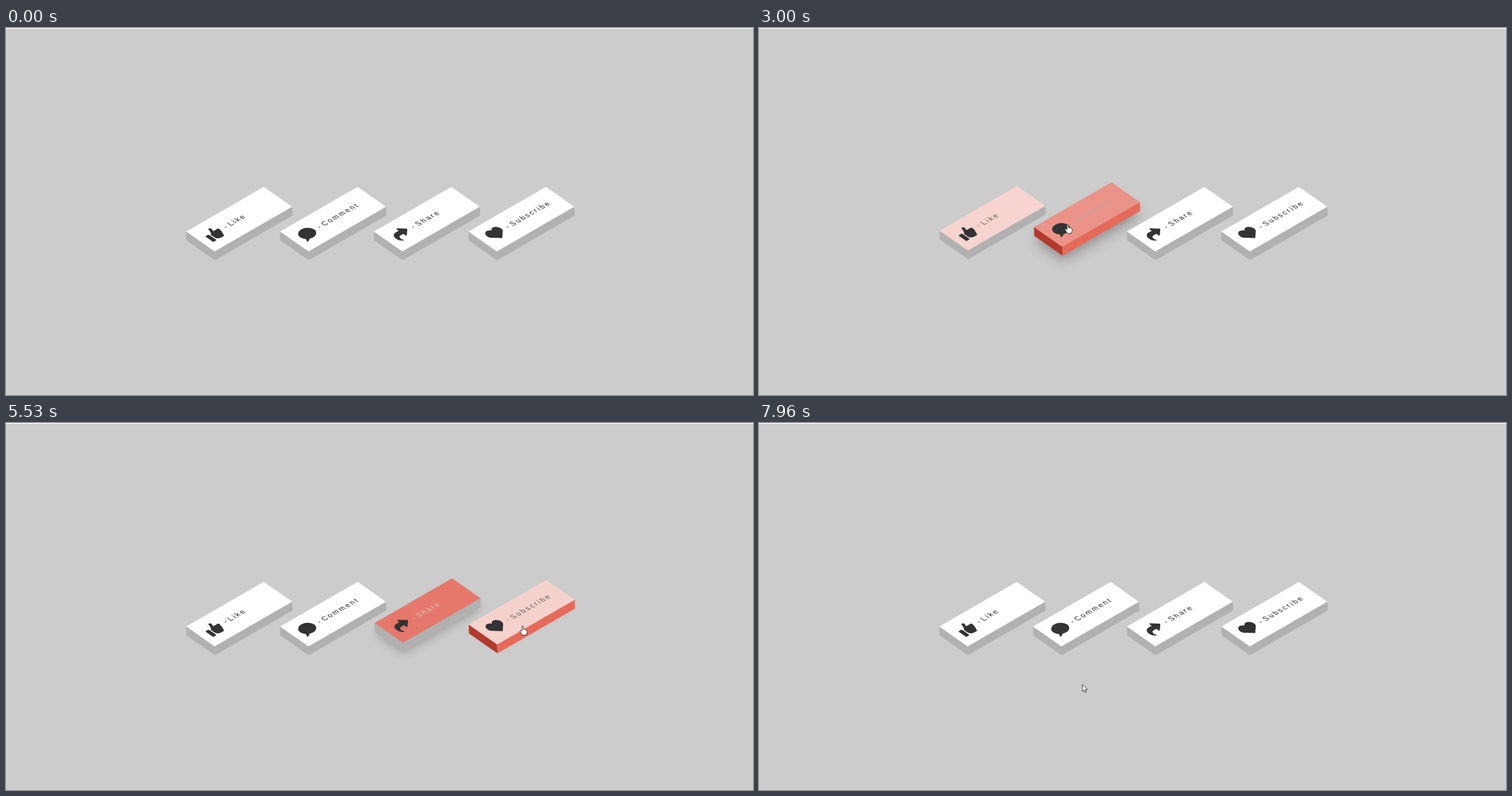
An HTML page that plays this animation: 1067x525 px, repeating every 8 s.

```html
<!DOCTYPE html>
<html lang="en">
<head>
<meta charset="utf-8">
<title>Isometric buttons</title>
<style>
  html, body { margin: 0; width: 100%; height: 100%; overflow: hidden; }
  body { position: relative; background: linear-gradient(#fff 1.5px, #ccc 1.5px); }
  .button {
    position: absolute; top: 251px; width: 128.2px; height: 44.8px;
    font: 10px/44.8px "Liberation Sans", Arial, sans-serif;
    letter-spacing: 2.22px; word-spacing: -3px; white-space: nowrap;
    --left: #b1b1b1; --front: #b1b1b1;
  }
  .button.on { --left: #b33a2c; --front: #e66a5a; }
  .button::before, .button::after { content: ""; position: absolute; }
  .button::before {
    right: 100%; top: 0; width: 11px; height: 100%;
    background: var(--left); transform: skewY(-45deg); transform-origin: right;
  }
  .button::after {
    left: 0; top: 100%; width: 100%; height: 11px;
    background: var(--front); transform: skewX(-45deg); transform-origin: top;
  }
  .button svg {
    position: absolute; left: 11.3px; top: 11px; width: 22.7px; height: 22.7px;
    fill: #333; stroke-linejoin: round;
  }
  .button span { position: absolute; left: 39.8px; top: .4px; }
  #cursor { position: absolute; left: 0; top: 0; width: 20px; height: 20px; overflow: visible; }
  #cursor path { fill: #fff; stroke: #222; stroke-width: .8; stroke-linejoin: round; }
</style>
</head>
<body>
<svg id="cursor">
  <path id="arrow" d="M0 0V10l2.3-2.2 1.6 3.5 1.6-.7-1.5-3.4h3z"/>
  <path id="hand" d="M-1 1C-1-.3 1-.3 1 1V5l4 .8q1.2.2 1.2 1.5V9.5q0 1.5-.8 2.7V13.3H-.8C-1.8 11-3 9.5-3.7 8-4 6.4-2.4 6.2-1 8z"/>
</svg>
<script>
const LOOP = 8000, STEP = 69, FADE = 500, COLOR_LAG = 64, POINTER_LEAD = 50;

// hover: alternating enter and leave times
const items = [
  { label: "Like", hover: [1320, 2640], icon: `
    <rect y="192" width="128" height="288" rx="32"/>
    <path d="M160 240C230 200 240 130 265 60 290 0 375 30 345 110L315 176H464c48 0 64 56 22 91
      20 30 5 66-28 77 14 32-6 62-27 71 4 38-17 65-47 65H290C200 480 160 410 160 368z"/>` },
  { label: "Comment", hover: [2760, 4200], icon: `
    <ellipse cx="256" cy="240" rx="256" ry="208"/>
    <path d="M60 360Q60 420 10 465 0 480 16 480 90 480 160 420z"/>` },
  { label: "Share", hover: [4290, 5376], icon: `
    <path d="M310 55L490 210 310 365z" stroke="#333" stroke-width="44"/>
    <path d="M310 128H176C-30 128-50 400 100 478 115 483 128 468 108 440 70 380 110 288 192 288H310z"/>` },
  { label: "Subscribe", hover: [5440, 5640, 5985, 7380], icon: `
    <path d="M256 480L48 300C17 272 0 232 0 185 0 50 160-30 256 96 352-30 512 50 512 185 512 232 495 272 464 300z"/>` }
];

// cursor moves: start, end, x, y; it rests in between
const home = [906, 401];
const moves = [
  [840, 1330, 342.5, 287],
  [1330, 1600, 327, 279],
  [2520, 3280, 478, 281],
  [4159, 4160, 497, 297],
  [4160, 4790, 606, 282],
  [5250, 5530, 738, 290],
  [5530, 5790, 776, 326],
  [5790, 6490, 763, 283],
  [7280, 7590, 640, 427],
  [7590, 7930, 462, 374]
];

const byId = id => document.getElementById(id);
const cursor = byId("cursor"), arrow = byId("arrow"), hand = byId("hand");
const lerp = (a, b, k) => a + (b - a) * k;
const mix = (a, b, k) => `rgb(${a.map((v, i) => Math.round(lerp(v, b[i], k)))})`;
const glide = k => Math.sin(Math.min(k, 1) * Math.PI / 2);
const isOver = (hover, t) => hover.filter(h => h <= t).length % 2 === 1;

items.forEach((item, i) => {
  const el = document.createElement("div");
  el.className = "button";
  el.style.left = 268.9 + i * 134.2 + "px";
  el.innerHTML = `<svg viewBox="0 0 512 512" overflow="visible">${item.icon}</svg><span>- ${item.label}</span>`;
  document.body.insertBefore(el, cursor);
  item.el = el;
  item.text = el.querySelector("span");
});

// the CSS "ease" curve: cubic-bezier(.25, .1, .25, 1)
function ease(x) {
  if (x <= 0) return 0;
  if (x >= 1) return 1;
  const curve = (s, a, b) => 3 * s * (1 - s) * ((1 - s) * a + s * b) + s ** 3;
  let lo = 0, hi = 1;
  for (let i = 0; i < 20; i++) {
    const mid = (lo + hi) / 2;
    if (curve(mid, .25, .25) < x) lo = mid; else hi = mid;
  }
  return curve(lo, .1, 1);
}

// hover transition from 0 to 1; lag delays the way back
function level(hover, t, lag = 0) {
  const times = hover.map((h, i) => h + (i % 2 ? lag : 0));
  let value = 0;
  times.forEach((start, i) => {
    if (t < start) return;
    const goal = 1 - i % 2;
    const end = Math.min(t, times[i + 1] ?? t);
    const span = FADE * Math.abs(goal - value) || 1;
    value = lerp(value, goal, ease((end - start) / span));
  });
  return value;
}

function drawButton({ el, text, hover }, t) {
  const lift = level(hover, t), tint = level(hover, t, COLOR_LAG);
  const off = 28 * lift;
  el.classList.toggle("on", isOver(hover, t));
  el.style.transform = `rotate(-30deg) skew(25deg) translate(${11.2 * lift}px, ${-8.4 * lift}px)`;
  el.style.boxShadow = `${-off}px ${off}px ${off}px rgba(0, 0, 0, ${lift / 2})`;
  el.style.background = mix([255, 255, 255], [221, 75, 57], tint);
  text.style.color = mix([38, 38, 38], [255, 255, 255], tint);
}

function drawCursor(t) {
  let [x, y] = home;
  for (const [start, end, toX, toY] of moves) {
    if (t < start) break;
    const k = glide((t - start) / (end - start));
    x = lerp(x, toX, k);
    y = lerp(y, toY, k);
  }
  const over = items.some(item => isOver(item.hover, t + POINTER_LEAD));
  cursor.style.display = t < moves[0][0] ? "none" : "block";
  cursor.style.transform = `translate(${x}px, ${y}px)`;
  hand.style.display = over ? "" : "none";
  arrow.style.display = over ? "none" : "";
}

const origin = performance.now();
function frame() {
  const now = (performance.now() - origin) % LOOP;
  // the picture advances in even steps from the start of each move
  const start = moves.findLast(m => m[0] <= now)?.[0] ?? 0;
  const t = start + Math.floor((now - start) / STEP) * STEP;
  items.forEach(item => drawButton(item, t));
  drawCursor(t);
  requestAnimationFrame(frame);
}
frame();
</script>
</body>
</html>
```
